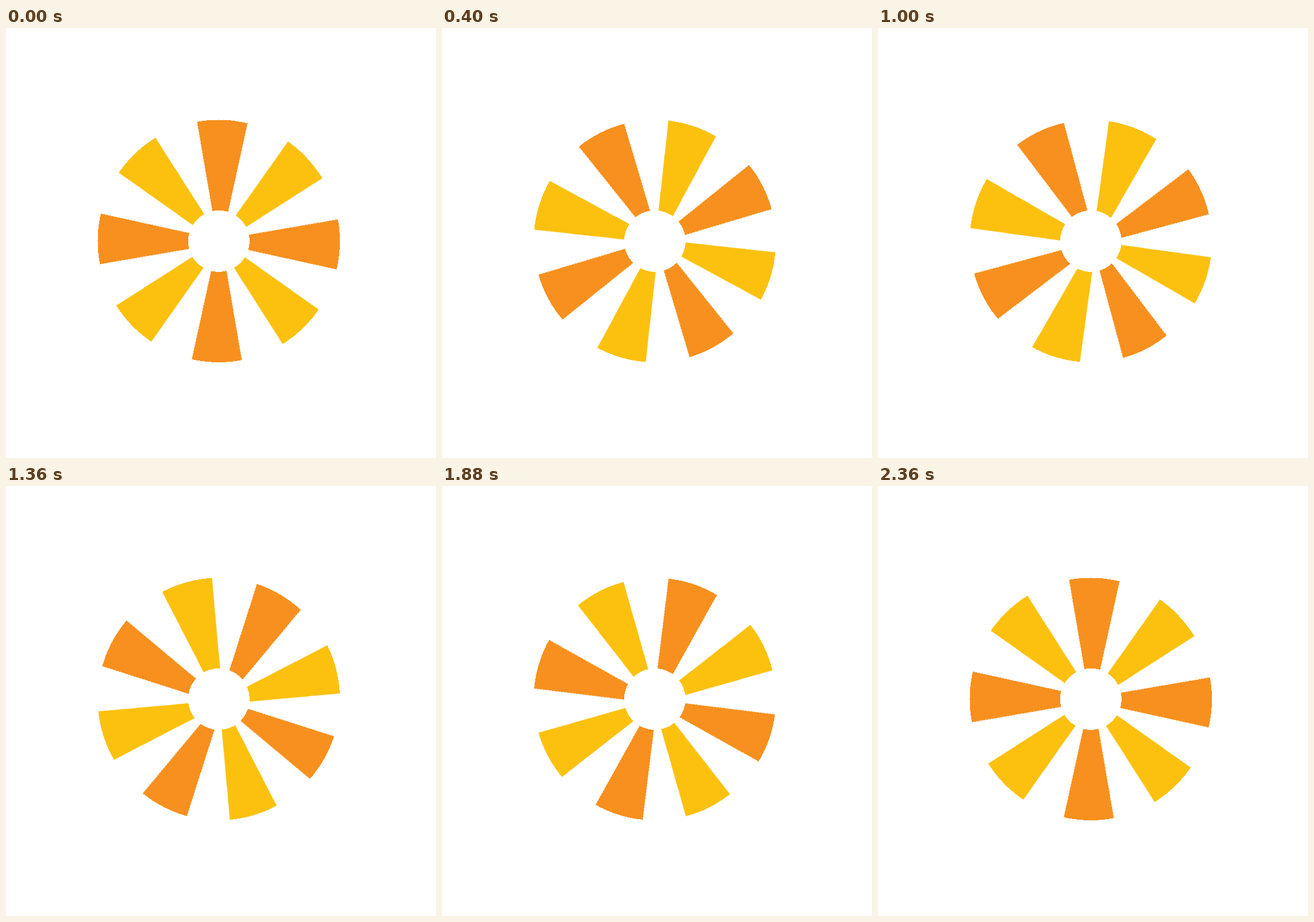
Write an HTML page that moves like this. It is 729 px wide and 728 px high and loops after 2.4 s.

```html
<!DOCTYPE html>
<html lang="en">
<head>
<meta charset="utf-8">
<title>Spinning sun</title>
<style>
  html, body { margin: 0; width: 100%; height: 100%; overflow: hidden; background: #fff; }
  svg { display: block; width: 729px; height: 728px; shape-rendering: crispEdges; }
  .wheel {
    transform-box: view-box;
    transform-origin: 364px 363.6px;
    animation: spin 2400ms steps(60, jump-none) infinite;
  }
  @keyframes spin {
    from { transform: rotate(0deg); }
    to { transform: rotate(360deg); }
  }
  .orange { fill: #f7901e; }
  .yellow { fill: #fcc10f; }
</style>
</head>
<body>
<svg viewBox="0 0 729 728">
  <defs>
    <path id="spoke" d="M-9.2-30L-48.3-230H48.3L9.2-30Z"/>
  </defs>
  <!-- The wheel's hub sits slightly off the turning point, so the spokes wobble. -->
  <g class="wheel">
    <g id="spokes" transform="translate(362.1 361.8) rotate(1.33)"></g>
  </g>
  <!-- Fixed white frame and hub -->
  <path fill="#fff" fill-rule="evenodd"
    d="M-20-20H750V750H-20ZM155.5 360.8a205.3 205.3 0 0 0 410.6 0a205.3 205.3 0 0 0 -410.6 0Z"/>
  <circle cx="360.8" cy="360.8" r="52" fill="#fff"/>
</svg>
<script>
  const spokes = document.getElementById('spokes');
  for (let i = 0; i < 8; i++) {
    const use = document.createElementNS('http://www.w3.org/2000/svg', 'use');
    use.setAttribute('href', '#spoke');
    use.setAttribute('class', i % 2 ? 'yellow' : 'orange');
    use.setAttribute('transform', `rotate(${i * 45})`);
    spokes.append(use);
  }
</script>
</body>
</html>
```
